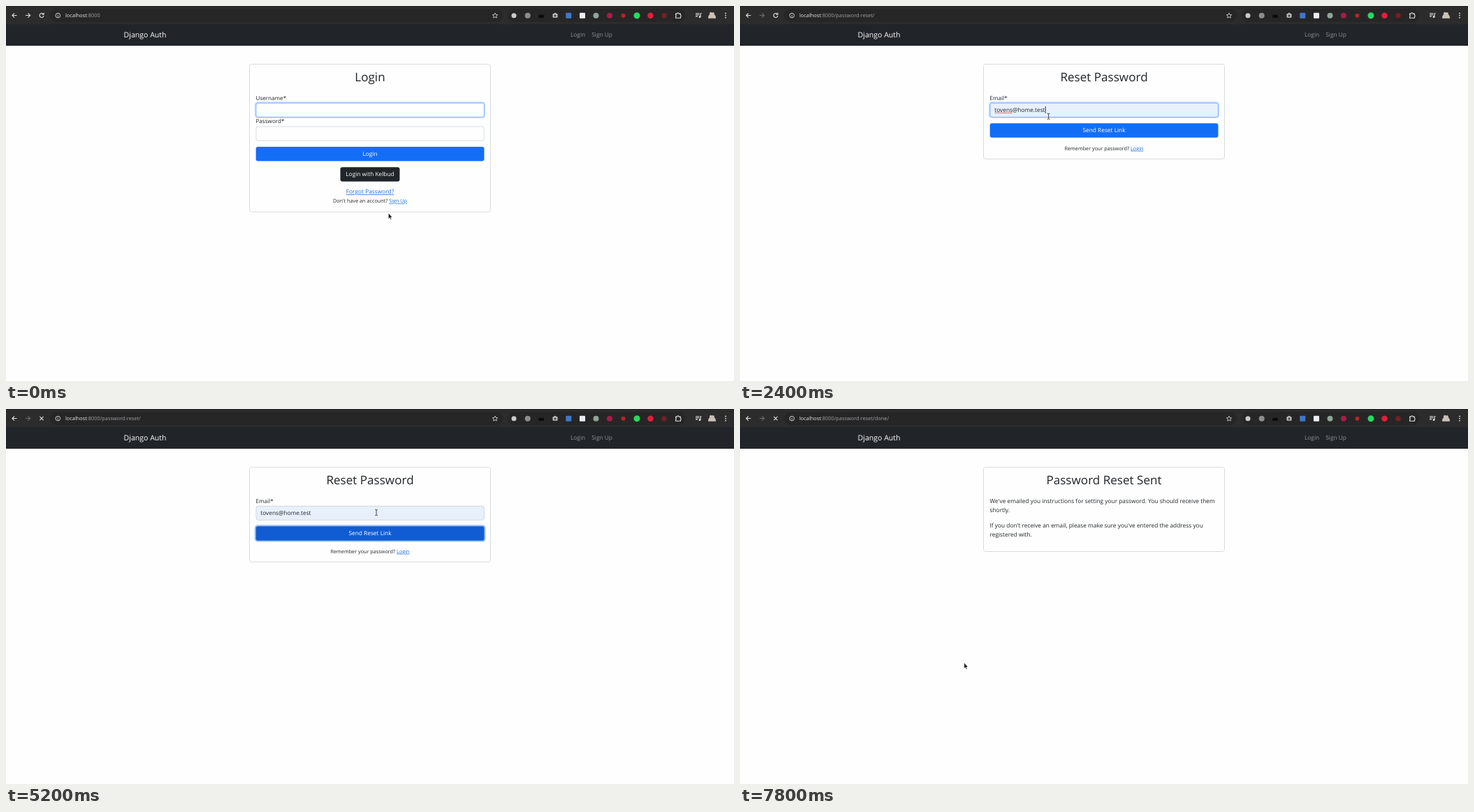
Recreate the animation shown at these times as an HTML page. Size 1042 px wide and 538 px high, loop 8 s.

```html
<!DOCTYPE html>
<html lang="en">
<head>
<meta charset="utf-8">
<title>Django Auth</title>
<style>
html, body { margin: 0; width: 100%; height: 100%; overflow: hidden; background: #fefefe; }
svg { display: block; width: 100vw; height: 100vh; }
text { font: 8.35px "Open Sans", "Noto Sans", sans-serif; fill: #212529; text-rendering: geometricPrecision; white-space: pre; }
.mid { text-anchor: middle; }
.title { font-size: 17.1px; font-weight: 500; }
.label { font-size: 8.1px; }
.small { font-size: 7.25px; }
.link { fill: #1b6fe0; text-decoration: underline; }
.url { font-size: 7.37px; fill: #9da0a4; }
.host { fill: #e6e7e9; }
.white { fill: #fff; }
.navlink { fill: #909294; }
.box { fill: #fefefe; stroke: #d8dce0; }
.btn { fill: #146ef5; }
.line { fill: none; stroke: #e3e3e3; stroke-width: 1.1; }
</style>
</head>
<body>
<svg viewBox="0 0 1042 538" preserveAspectRatio="none">
  <rect width="1042" height="538" fill="#fefefe"/>
  <rect width="1042" height="27" fill="#2d2c2d"/>
  <rect width="1042" height="1" fill="#202020"/>
  <rect x="63" y="4" width="648" height="19" rx="9.5" fill="#272627"/>
  <rect x="718" y="4" width="254" height="19" rx="9.5" fill="#272627"/>
  <rect y="26" width="1042" height="31" fill="#212529"/>

  <g class="line">
    <path d="M15.5 13.5H9M12 10.4L8.9 13.5L12 16.6"/>
    <path id="forward" d="M28 13.5H34.5M31.5 10.4L34.6 13.5L31.5 16.6"/>
    <path id="reload" d="M53.4 11.5A3 3 0 1 0 54 14.2M54 9.8V12.2H51.5"/>
    <path id="stop" d="M48.4 10.9L53.6 16.1M53.6 10.9L48.4 16.1"/>
    <circle cx="74.3" cy="13.6" r="3.3" stroke-width=".9"/>
    <path d="M74.3 13.2V15.6M74.3 11.5V12.3" stroke-width=".9"/>
    <path d="M700 10L701.1 12.4L703.7 12.7L701.8 14.4L702.3 17L700 15.7L697.7 17L698.2 14.4L696.3 12.7L698.9 12.4Z" stroke-width=".8"/>
    <path d="M958.6 11.1H960.6A1.3 1.3 0 0 1 963.2 11.1H965.4V13A1.3 1.3 0 0 1 965.4 15.4V17.3H958.6V15.2A1.2 1.2 0 0 0 958.6 13Z"/>
    <path d="M987 10.7H992.4M987 12.8H992.4M987 14.9H990M994 15.8V10.8H995.6"/>
  </g>
  <circle cx="993" cy="15.7" r="1.4" fill="#e3e3e3"/>
  <g id="extensions"></g>
  <rect x="782.5" y="11" width="7" height="5.8" rx="1" fill="#bfc1c3"/>
  <rect x="784.7" y="9.9" width="2.6" height="2" fill="#bfc1c3"/>
  <circle cx="786" cy="13.9" r="1.6" fill="#454648"/>
  <rect x="762.3" y="12.7" width="7.6" height="4.2" fill="#0c0a0a"/>
  <path d="M1005 17.8Q1005 12.9 1007.5 12.3A2 2 0 1 1 1010.3 12.2A2 2 0 1 1 1013.6 12.3Q1016 13 1016 17.8Z" fill="#c9c2b9"/>
  <g fill="#e3e3e3"><circle cx="1030" cy="10.5" r=".9"/><circle cx="1030" cy="13.6" r=".9"/><circle cx="1030" cy="16.7" r=".9"/></g>
  <text class="url" x="85" y="16.2"><tspan class="host">localhost</tspan>:8000<tspan id="path"></tspan></text>

  <g id="nav">
    <text class="white" x="168.6" y="45" style="font-size:10.55px">Django Auth</text>
    <text class="navlink" x="808" y="44.1">Login</text>
    <text class="navlink" x="838.2" y="44.1">Sign Up</text>
  </g>

  <rect id="card" class="box" x="348.5" y="83.5" width="345" rx="3.2"/>
  <g id="login">
    <text class="mid title" x="521" y="108">Login</text>
    <text class="label" x="357.5" y="134.7">Username*</text>
    <rect id="userGlow" x="356" y="137.2" width="330" height="23.8" rx="4.5" fill="#c2dbfe"/>
    <rect id="user" class="box" x="358" y="139.3" width="326.3" height="20" rx="3"/>
    <text class="label" x="357.5" y="168.2">Password*</text>
    <rect class="box" x="358" y="173" width="326.3" height="20" rx="3"/>
    <rect class="btn" x="357.7" y="202" width="326.8" height="20.5" rx="3"/>
    <text class="mid white" x="521" y="214.6">Login</text>
    <rect x="478.5" y="231.2" width="85" height="20.6" rx="3" fill="#212529"/>
    <text class="mid white" x="521" y="244">Login with Kelbud</text>
    <text class="mid link" x="521" y="269.3">Forgot Password?</text>
    <text class="mid small" x="521" y="282.4">Don't have an account? <tspan class="link">Sign Up</tspan></text>
  </g>
  <g id="reset">
    <text class="mid title" x="521" y="108.4">Reset Password</text>
    <text class="label" x="357.5" y="135">Email*</text>
    <rect id="mailGlow" x="356" y="137.2" width="330" height="23.8" rx="4.5" fill="#c2dbfe"/>
    <rect id="mailBox" class="box" x="358" y="139.3" width="326.3" height="20" rx="3"/>
    <text id="mail" x="364.3" y="152" style="font-size:8.3px"></text>
    <path id="squiggle" fill="none" stroke="#e03a3a" stroke-width=".8"/>
    <rect id="caret" y="144" width=".9" height="10" fill="#212529"/>
    <rect id="sendGlow" x="355.8" y="166.2" width="330.6" height="24.3" rx="4.5" fill="#9dc2fb"/>
    <rect id="send" class="btn" x="357.7" y="168.3" width="326.8" height="20.4" rx="3"/>
    <text class="mid white" x="521" y="181.3">Send Reset Link</text>
    <text class="mid small" x="521" y="206.7">Remember your password? <tspan class="link">Login</tspan></text>
  </g>
  <g id="done">
    <text class="mid title" x="521" y="108.4">Password Reset Sent</text>
    <text x="357.5" y="135">We've emailed you instructions for setting your password. You should receive them</text>
    <text x="357.5" y="148">shortly.</text>
    <text x="357.5" y="169.8">If you don't receive an email, please make sure you've entered the address you</text>
    <text x="357.5" y="182.8">registered with.</text>
  </g>
  <g id="status">
    <path d="M0 527H119.5Q121.5 527 121.5 529V538H0Z" fill="#242426"/>
    <text class="white" x="2.3" y="535.8" style="font-size:7.93px">localhost:8000/password-reset/</text>
  </g>
  <g id="cursor">
    <path id="arrow" d="M0 0V8.4L1.9 6.7L3.2 9.5L4.5 8.9L3.3 6.2H5.8Z" fill="#1a1a1a" stroke="#fff" stroke-width=".6"/>
    <path id="beam" d="M-1.9 -4.2Q-.2 -4.2 0 -3.3Q.2 -4.2 1.9 -4.2M0 -3.5V3.5M-1.9 4.2Q-.2 4.2 0 3.3Q.2 4.2 1.9 4.2" fill="none" stroke="#333" stroke-width=".9"/>
    <path id="hand" d="M-.8 -3.8Q0 -4.7 .8 -3.8V-.9L3.2 -.3Q4 0 3.8 1.1L3 4.3H-1L-3 1.1Q-2.6 .1 -.8 1.3Z" fill="#1a1a1a" stroke="#fff" stroke-width=".6"/>
  </g>
</svg>
<script>
const $ = id => document.getElementById(id);
const show = (id, on) => $(id).style.display = on ? '' : 'none';
const set = (id, name, value) => $(id).setAttribute(name, value);

const LOOP = 8000, STEP = 200;
const PAGES = {
  login: { path: '', height: 212 },
  reset: { path: '/password-reset/', height: 136 },
  done: { path: '/password-reset/done/', height: 121 }
};
const EMAIL = 'tovens@home.test';

// Pointer track: time, x, y
const TRACK = [
  [0, 547.3, 297], [200, 547, 296], [800, 517.2, 262.3], [1200, 517, 262],
  [1800, 423.5, 148], [2200, 423.5, 149], [2800, 493.5, 185], [3200, 500, 184],
  [4000, 501, 184], [4600, 584, 150], [5000, 584, 148], [5600, 376, 150],
  [6400, 511.5, 154.5], [6800, 530, 180], [7200, 470, 194], [7800, 320.7, 364], [8000, 320.7, 364]
];

// x, size, colour and shape of the toolbar buttons
$('extensions').innerHTML = [
  [727, 7, '#c9cbcd'], [746.7, 8, '#8b8d8f'], [805.3, 8, '#3f78c9', 1], [825, 8, '#e9ecf2', 1],
  [844.5, 8, '#8da697'], [864, 8, '#a51d4b'], [883.5, 6, '#b3262b'], [903, 9, '#2bd760'],
  [922.5, 8.5, '#e01f3d'], [942, 7.5, '#702226']
].map(([x, size, fill, square]) =>
  `<rect x="${x - size / 2}" y="${13.7 - size / 2}" width="${size}" height="${size}" rx="${square ? 1 : size / 2}" fill="${fill}"/>`
).join('');

function pointer(t) {
  const i = Math.max(1, TRACK.findIndex(p => p[0] >= t));
  const [t0, x0, y0] = TRACK[i - 1], [t1, x1, y1] = TRACK[i];
  const k = (t - t0) / (t1 - t0), e = k * k * (3 - 2 * k);
  return [x0 + (x1 - x0) * e, y0 + (y1 - y0) * e];
}

function drawPointer(t, page) {
  const [x, y] = pointer(t);
  const inside = (top, bottom) => page === 'reset' && x > 358 && x < 684 && y > top && y < bottom;
  const beam = inside(139, 160), hand = inside(168, 189);
  set('cursor', 'transform', `translate(${x} ${y})`);
  show('beam', beam);
  show('hand', hand);
  show('arrow', !beam && !hand);
  return hand;
}

function drawEmail(t, hover) {
  const focused = t >= 2000 && t < 3200, sent = t >= 3200, filled = t >= 2400;
  $('mail').textContent = filled ? EMAIL : '';
  show('mailGlow', focused);
  set('mailBox', 'style', `fill:${filled ? '#e8f0fc' : '#fefefe'};stroke:${focused ? '#86b7fe' : '#d0d8e0'}`);
  show('caret', focused);
  set('caret', 'x', 364.5 + (filled ? $('mail').getComputedTextLength() : 0));
  show('squiggle', focused && filled);
  if (filled) {
    let d = 'M364.5 154';
    const end = 364.5 + $('mail').getSubStringLength(0, 6);
    for (let x = 366, up = 1; x < end; x += 1.5, up = !up) d += `L${x} ${up ? 152.7 : 154.2}`;
    set('squiggle', 'd', d);
  }
  show('sendGlow', sent);
  $('send').style.fill = hover || sent ? '#115cd2' : '';
}

function draw(t) {
  const page = t < 1200 ? 'login' : t < 7600 ? 'reset' : 'done';
  const loading = t >= 1000 && t < 1200 || t >= 3200;
  for (const name in PAGES) show(name, name === page);
  $('path').textContent = PAGES[page].path;
  set('card', 'height', PAGES[page].height);
  set('nav', 'transform', `translate(0 ${page === 'login' ? 0 : 0.4})`);
  set('forward', 'stroke', page === 'login' ? '#e3e3e3' : '#6d6d6f');
  show('reload', !loading);
  show('stop', loading);
  show('status', t >= 800 && t < 1400);

  const userFocus = t < 1000;
  show('userGlow', userFocus);
  $('user').style.stroke = userFocus ? '#86b7fe' : '';
  const hover = drawPointer(t, page);
  if (page === 'reset') drawEmail(t, hover);
}

const start = performance.now();
function tick() {
  const t = (performance.now() - start) % LOOP;
  draw(Math.floor(t / STEP) * STEP);
  requestAnimationFrame(tick);
}
tick();
</script>
</body>
</html>
```
